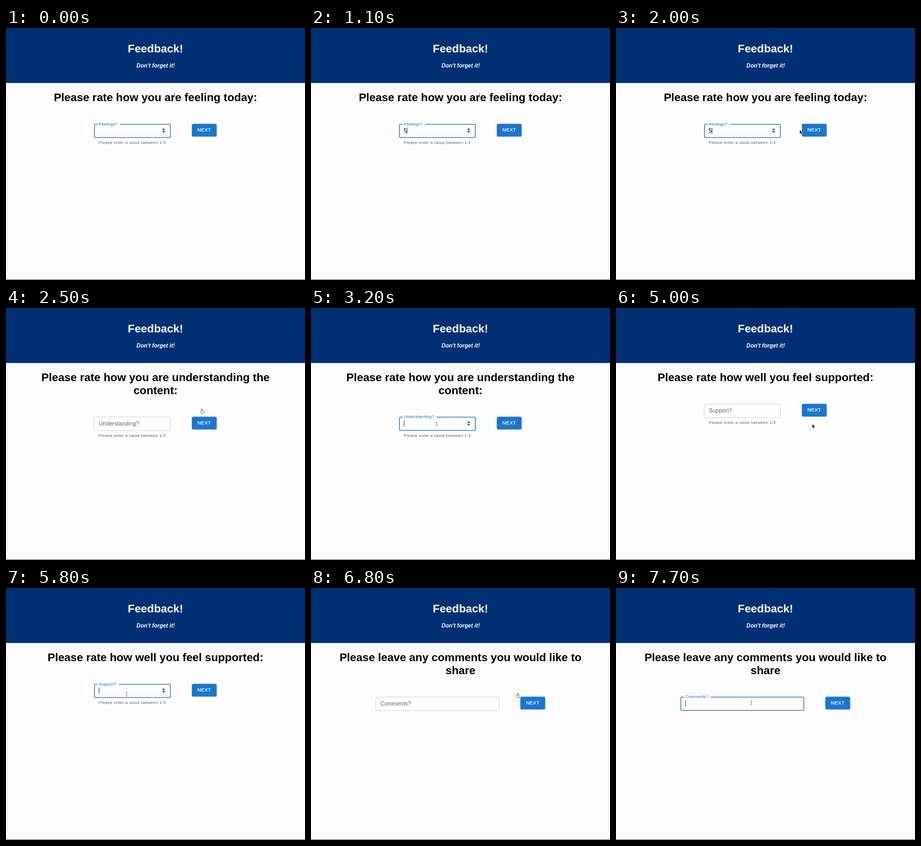
These frames come from a looping animation (550x465 px, 8000 ms). An HTML page:

```html
<!DOCTYPE html>
<html lang="en">
<head>
<meta charset="utf-8">
<title>Feedback</title>
<style>
  html, body { margin: 0; width: 100%; height: 100%; overflow: hidden; background: #fdfdfd; }
  svg { display: block; width: 550px; height: 465px; font-family: "Liberation Sans", Arial, sans-serif; }
  .h1 { font-size: 20.6px; font-weight: 700; text-anchor: middle; }
  .sub { font-size: 10.32px; font-weight: 700; font-style: italic; text-anchor: middle; }
  .white { fill: #fff; }
  .label, .value { font-size: 10.32px; letter-spacing: .1px; }
  .helper { font-size: 7.74px; letter-spacing: .258px; fill: #666; }
  .next { font-size: 9.03px; letter-spacing: .32px; fill: #fff; stroke: #fff; stroke-width: .2px; }
  #button rect { filter: drop-shadow(0 .9px .9px rgba(0,0,0,.35)); }
  #outline { fill: none; }
</style>
</head>
<body>
<svg viewBox="0 0 550 465">
  <rect width="550" height="465" fill="#fdfdfd"/>
  <rect width="550" height="101.5" fill="#003074"/>
  <rect y="464" width="550" height="1" fill="#5c5c5e"/>
  <text class="h1 white" x="275" y="45.3">Feedback!</text>
  <text class="sub white" x="275.3" y="73">Don't forget it!</text>
  <text class="h1" id="line1" x="275" y="135"></text>
  <text class="h1" id="line2" x="275" y="158.6"></text>

  <g id="form">
    <path id="outline"/>
    <g id="spinner">
      <rect x="285" y="183.6" width="9.8" height="11" rx="1" fill="#efefef"/>
      <path d="M287.2 188.2l2.7-3.2 2.7 3.2zM287.2 190.2l2.7 3.2 2.7-3.2z" fill="#444"/>
    </g>
    <text id="label" class="label"></text>
    <text id="value" class="value" y="193.2">5</text>
    <rect id="caret" y="183.8" width=".8" height="11.6" fill="#111"/>
    <text id="helper" class="helper" x="170.6" y="214">Please enter a value between 1-5</text>
    <g id="button">
      <rect y="177" width="45.4" height="23.3" rx="2.6"/>
      <text class="next" x="10" y="191.4">NEXT</text>
    </g>
  </g>

  <g id="pointer">
    <path id="arrow" d="M0 0V7.6L1.8 6 3 8.7 4.2 8.2 3 5.6H5.4Z" fill="#111" stroke="#fff" stroke-width=".5"/>
    <path id="ibeam" d="M-1.6-3.6Q0-3.6 0-2.6V2.6Q0 3.6-1.6 3.6M1.6-3.6Q0-3.6 0-2.6M0 2.6Q0 3.6 1.6 3.6" fill="none" stroke="#555" stroke-width=".7"/>
    <path id="hand" d="M-1.6 .4V-3.4Q-1-4.4-.4-3.4V-.6Q.6-1.2 1.1-.4 2-.8 2.4 0 3.4-.1 3.4 .9V2.4L2.4 4.4H-1.2L-3.4 1.4Q-3.4 .2-2.4 .7Z" fill="#fff" stroke="#333" stroke-width=".7"/>
  </g>
</svg>

<script>
const LOOP = 8000, STEP = 100, BLUE = '#1976d2';
const $ = id => document.getElementById(id);
const set = (id, attrs) => { for (const k in attrs) $(id).setAttribute(k, attrs[k]); };
const show = (id, on) => set(id, { visibility: on ? 'visible' : 'hidden' });
const clamp = v => Math.max(0, Math.min(1, v));
const mix = (a, b, p) => a + (b - a) * p;

const rating = { x: 162, w: 141, btn: 342, number: true };
const pages = [
  { ...rating, start: 0, focus: -600, typed: 900, label: 'Feelings?', notch: 41,
    title: ['Please rate how you are feeling today:'] },
  { ...rating, start: 2400, focus: 2900, typed: 3700, label: 'Understanding?', notch: 62,
    title: ['Please rate how you are understanding the', 'content:'] },
  { ...rating, start: 4700, focus: 5600, typed: 6000, label: 'Support?', notch: 39,
    title: ['Please rate how well you feel supported:'] },
  { start: 6700, focus: 7500, typed: Infinity, label: 'Comments?', notch: 49,
    x: 118.7, w: 227.5, btn: 385.2, number: false,
    title: ['Please leave any comments you would like to', 'share'] }
];

// time, x, y
const path = [
  [0, 310, 124], [1700, 310, 124], [2000, 338, 188], [2200, 361, 190], [2500, 361, 190],
  [2900, 234, 213], [3200, 231, 214], [4200, 231, 214], [4600, 361, 214], [5200, 361, 214],
  [5600, 225, 196], [5800, 222, 196], [6000, 222, 196], [6400, 381, 198], [6800, 381, 198],
  [7400, 249, 212], [8000, 249, 212]
];

const pageAt = t => pages.findLast(p => t >= p.start) || pages[0];
const shiftOf = page => page.title.length > 1 ? 23.7 : 0;

function pointerAt(t) {
  const i = path.findIndex(k => k[0] > t);
  const [t0, x0, y0] = path[i - 1], [t1, x1, y1] = path[i];
  const u = (t - t0) / (t1 - t0), p = u * u * (3 - 2 * u);
  return [mix(x0, x1, p), mix(y0, y1, p)];
}

function outline(x, y, w, h, r, gap) {
  const top = gap ? `M${x + 6 + gap} ${y}` : `M${x + r} ${y}`;
  const end = gap ? `H${x + 6}` : 'Z';
  return `${top}H${x + w - r}q${r} 0 ${r} ${r}v${h - 2 * r}q0 ${r} ${-r} ${r}` +
    `H${x + r}q${-r} 0 ${-r} ${-r}V${y + r}q0 ${-r} ${r} ${-r}${end}`;
}

function drawPointer(t) {
  const [x, y] = pointerAt(t);
  // the pointer shape lags slightly behind a page change
  const page = pageAt(t - 150), dy = shiftOf(page);
  const inside = (x0, y0, w, h) => x >= x0 && x <= x0 + w && y >= y0 + dy && y <= y0 + dy + h;
  const hand = inside(page.btn, 177, 45.4, 23.3);
  const beam = !hand && (inside(page.x, 177, page.w, 26) || y < 140);
  show('hand', hand);
  show('ibeam', beam);
  show('arrow', !hand && !beam);
  set('pointer', { transform: `translate(${x} ${y})` });
  return [x, y];
}

function draw(t) {
  const page = pageAt(t), dy = shiftOf(page), { x, w } = page;
  const focused = t >= page.focus, typed = t >= page.typed;
  const [px, py] = drawPointer(t);
  const over = (x0, w0, h) => px >= x0 && px <= x0 + w0 && py >= 177 + dy && py <= 177 + dy + h;

  $('line1').textContent = page.title[0];
  $('line2').textContent = page.title[1] || '';
  set('form', { transform: `translate(0 ${dy})` });

  const line = focused ? 1.3 : .7;
  set('outline', {
    d: outline(x + line / 2, 177 + line / 2, w - line, 25.8 - line, 2.3, focused ? page.notch : 0),
    stroke: focused ? BLUE : '#c4c4c4', 'stroke-width': line
  });

  const rise = 1 - (1 - clamp((t - page.focus) / 200)) ** 3;
  $('label').textContent = page.label;
  set('label', {
    transform: `translate(${x + 8.8} ${mix(193.2, 179.7, rise)}) scale(${mix(1, .75, rise)})`,
    fill: focused ? BLUE : '#666'
  });

  const blinkStart = typed ? page.typed : page.focus;
  show('value', typed);
  show('caret', focused && Math.floor((t - blinkStart) / 500) % 2 === 0);
  set('value', { x: x + 8.6 });
  set('caret', { x: x + (typed ? 14.4 : 8.8) });
  show('spinner', page.number && (focused || over(x, w, 26)));
  show('helper', page.number);

  set('button', {
    transform: `translate(${page.btn} 0)`,
    fill: over(page.btn, 45.4, 23.3) ? '#1569c4' : BLUE
  });
}

const began = performance.now();
function tick() {
  const t = Math.max(0, performance.now() - began) % LOOP;
  draw(Math.floor(t / STEP) * STEP);
  requestAnimationFrame(tick);
}
tick();
</script>
</body>
</html>
```
